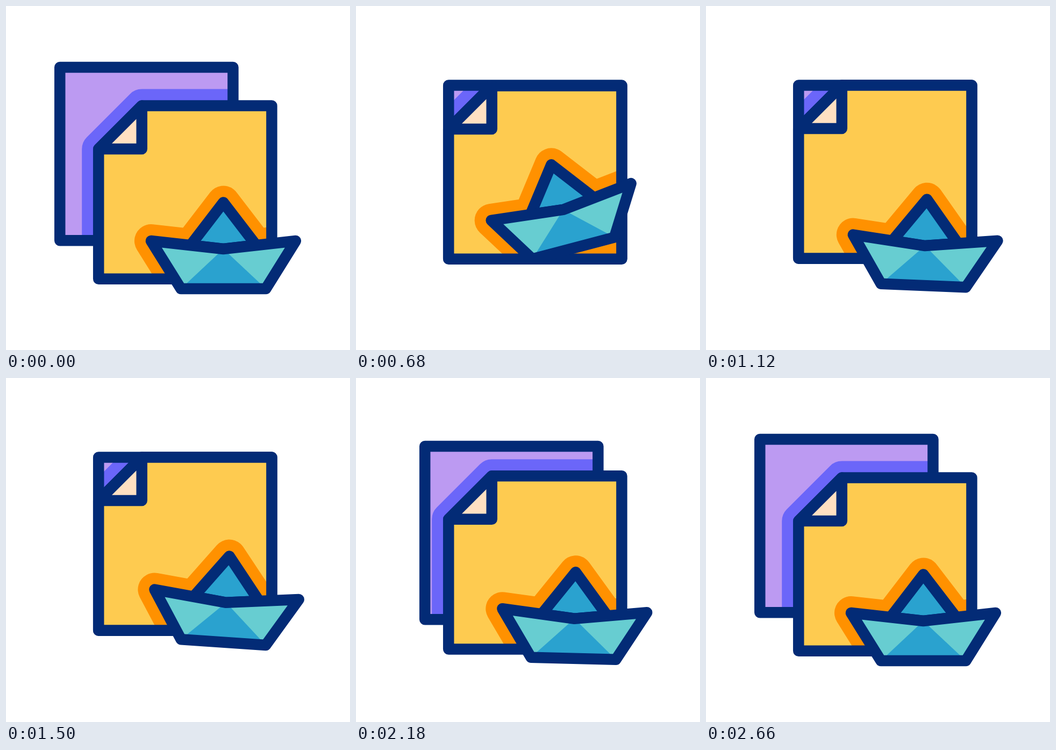
Recreate the animation shown at these times as an HTML page with a canvas. Size 640 px wide and 640 px high, loop 3600 ms.

```html
<!DOCTYPE html>
<html lang="en">
<head>
<meta charset="utf-8">
<title>Paper boat</title>
<style>
  html, body { margin: 0; height: 100%; overflow: hidden; background: #fff; }
  canvas { display: block; width: 640px; height: 640px; }
</style>
</head>
<body>
<canvas width="640" height="640"></canvas>
<script>
const ctx = document.querySelector('canvas').getContext('2d');
const LOOP = 3600, LINE = 20.5, SHADOW = 62, SIZE = 322.2, FOLD = 80.5;
const NAVY = '#032b76', LILAC = '#bc9af2', INDIGO = '#6b66f9', YELLOW = '#fecb50',
      PEACH = '#ffe0c2', ORANGE = '#ff9100', TEAL = '#67cdd1', BLUE = '#2aa2cf';

const polygon = (...points) => new Path2D('M' + points.join(' ') + 'Z');

// Sheets start at their top left corner.
const backSheet = polygon([0, 0], [SIZE, 0], [SIZE, SIZE], [0, SIZE]);
const sheet = polygon([FOLD, 0], [SIZE, 0], [SIZE, SIZE], [0, SIZE], [0, FOLD]);
const fold = polygon([FOLD, 0], [FOLD, FOLD], [0, FOLD]);

// The boat is symmetric about the middle of its keel.
const mirror = ([x, y]) => [-x, y];
const dip = [0, -74], tip = [134.5, -89], keel = [79, 0], mast = [0, -160.5], sailFoot = [61, -81];
const hull = polygon(dip, tip, keel, mirror(keel), mirror(tip));
const hullShade = polygon(dip, keel, mirror(keel));
const sail = polygon(mast, sailFoot, dip, mirror(sailFoot));

function ease(t, from, to) {
  const p = Math.min(1, Math.max(0, (t - from) / (to - from)));
  return p * p * (3 - 2 * p);
}

// Rises from 0 to 1 at the peak and falls back to 0.
const hill = (t, from, peak, to) => ease(t, from, peak) - ease(t, peak, to);

function fill(path, color) {
  ctx.fillStyle = color;
  ctx.fill(path);
}

function stroke(path, color, width) {
  ctx.strokeStyle = color;
  ctx.lineWidth = width;
  ctx.stroke(path);
}

function placed(place, paint) {
  ctx.save();
  place();
  paint();
  ctx.restore();
}

// Fills a sheet, casts a shadow onto it, then outlines it.
function drawSheet(place, path, color, castShadow) {
  placed(place, () => fill(path, color));
  ctx.save();
  const base = ctx.getTransform();
  place();
  ctx.clip(path);
  ctx.setTransform(base);
  castShadow();
  ctx.restore();
  placed(place, () => stroke(path, NAVY, LINE));
}

function draw(t) {
  const back = ease(t, 0, 600) - ease(t, 1836, 2436);
  const lift = 38.2 * (ease(t, 140, 740) - ease(t, 1645, 2300));
  const bob = 75.6 * hill(t, 100, 670, 1215) + 59 * hill(t, 1215, 1730, 2270);
  const tilt = 10 * hill(t, 740, 1340, 1740) + 3.3 * hill(t, 1740, 2340, 2660)
    - 15.2 * hill(t, 130, 740, 1340) - 7 * hill(t, 1340, 1740, 2340);

  const placeBack = () => ctx.translate(100.2 + 72 * back, 114 + 33.5 * back);
  const placeSheet = () => ctx.translate(172.2, 185.6 - lift);
  const placeBoat = () => {
    ctx.translate(404.4, 526 - bob);
    ctx.rotate(tilt * Math.PI / 180);
  };

  ctx.fillStyle = '#fff';
  ctx.fillRect(0, 0, 640, 640);
  ctx.lineJoin = 'round';

  drawSheet(placeBack, backSheet, LILAC, () =>
    placed(placeSheet, () => stroke(sheet, INDIGO, SHADOW)));

  drawSheet(placeSheet, sheet, YELLOW, () =>
    placed(placeBoat, () => {
      stroke(sail, ORANGE, SHADOW);
      stroke(hull, ORANGE, SHADOW);
    }));

  placed(placeSheet, () => {
    fill(fold, PEACH);
    stroke(fold, NAVY, LINE);
  });

  placed(placeBoat, () => {
    fill(sail, BLUE);
    stroke(sail, NAVY, LINE);
    fill(hull, TEAL);
    fill(hullShade, BLUE);
    stroke(hull, NAVY, LINE);
  });
}

function tick() {
  draw(performance.now() % LOOP);
  requestAnimationFrame(tick);
}
tick();
</script>
</body>
</html>
```
